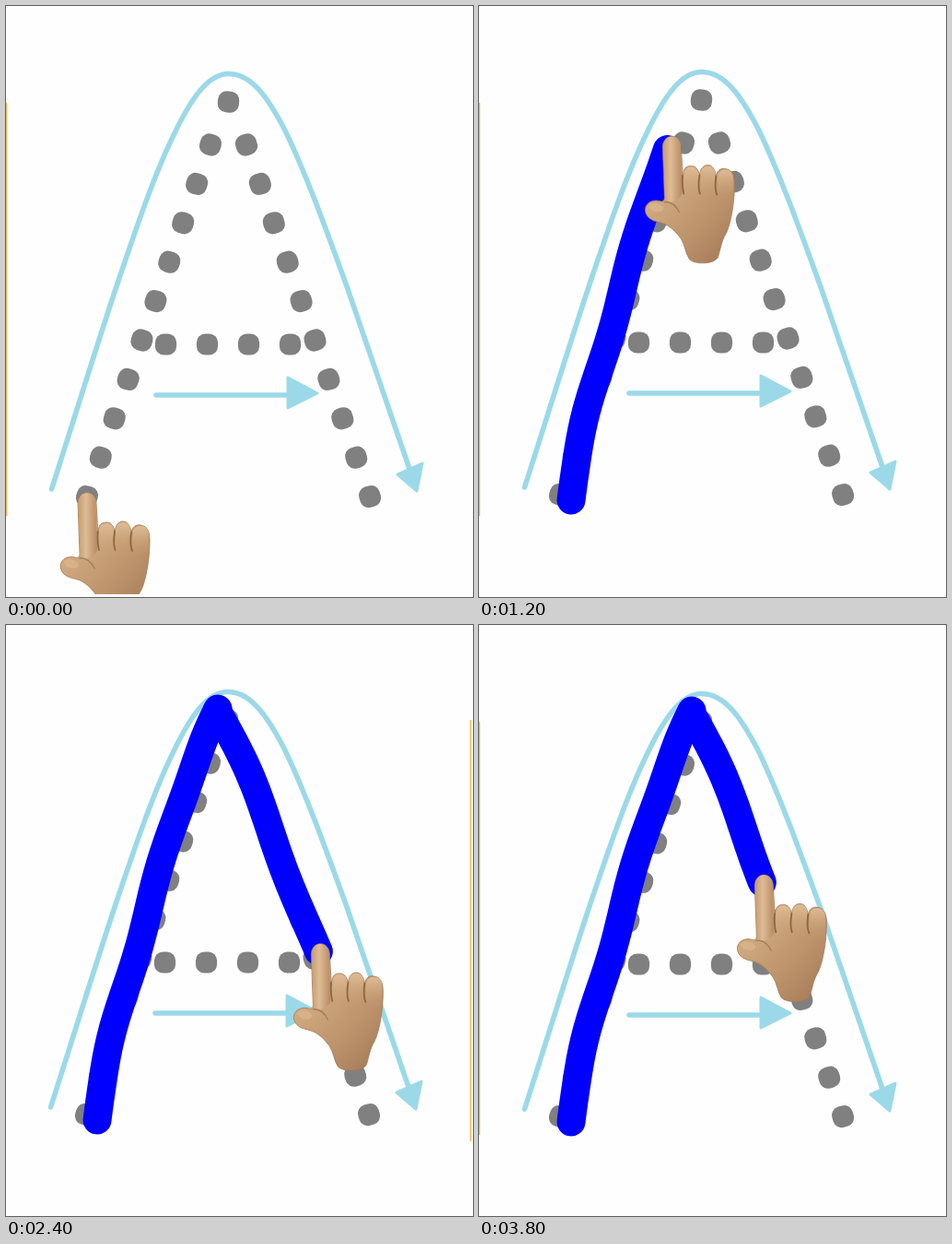
Recreate the animation shown at these times as an HTML page. Size 507 px wide and 641 px high, loop 4000 ms.

```html
<!DOCTYPE html>
<html lang="en">
<head>
<meta charset="utf-8">
<title>Tracing the letter A</title>
<style>
html, body { margin: 0; width: 100%; height: 100%; overflow: hidden; background: #fefefe; }
svg { display: block; width: 100%; height: 100%; }
</style>
</head>
<body>
<svg viewBox="0 0 507 641" preserveAspectRatio="none">
  <defs>
    <linearGradient id="skin" x1="0" y1="0" x2=".75" y2="1">
      <stop offset="0" stop-color="#deba92"/>
      <stop offset=".45" stop-color="#cda57c"/>
      <stop offset=".75" stop-color="#bb926a"/>
      <stop offset="1" stop-color="#a9805c"/>
    </linearGradient>
    <linearGradient id="finger" x1="0" x2="1">
      <stop offset="0" stop-color="#c59c70"/>
      <stop offset=".4" stop-color="#dfbc96"/>
      <stop offset="1" stop-color="#b58a62"/>
    </linearGradient>
    <linearGradient id="knuckle" x1="0" y1="0" x2="0" y2="1">
      <stop offset="0" stop-color="#dfbc96"/>
      <stop offset="1" stop-color="#c69c71" stop-opacity="0"/>
    </linearGradient>
    <clipPath id="crop"><rect width="507" height="638"/></clipPath>
  </defs>
  <g fill="#f6b95c">
    <rect id="leftEdge" y="105" width="1.2" height="448"/>
    <rect id="rightEdge" x="503.6" y="103" width="1.6" height="457"/>
  </g>
  <g id="art">
    <g fill="none" stroke="#9bd9e8" stroke-width="5.6" stroke-linecap="round" stroke-linejoin="round">
      <path d="M49.500 524C75 445 100 363 122 298C140 245 160 185 182 140C202 98 220 73.500 242 73.500C266 73.500 284 98 304 137C326 183 346 238 370 304L438 502"/>
      <path d="M163 422H306"/>
      <g fill="#9bd9e8" stroke-width="3">
        <path d="M425 508L452 496L446 526Z"/>
        <path d="M306 403V436L338 420Z"/>
      </g>
    </g>
    <g id="dots" fill="#808080"></g>
    <g id="ink" fill="none" stroke="#00f" stroke-width="31" stroke-linecap="round" stroke-linejoin="round"></g>
  </g>
  <g clip-path="url(#crop)">
    <g id="hand">
      <path fill="url(#skin)" stroke="#a37a55" stroke-width=".8" d="M-10 11C-9 -4 9 -4 10 11L12 45C12 35 15 32 21 32C26 32 29 36 30 42C31 35 34 31 39 31C44 31 47 36 48 43C49 37 53 34 58 35C66 36 68 43 68 52C68 72 64 95 59 105C53 115 53 122 50 131C46 139 24 139 19 133C15 127 14 117 10 111C2 100 -5 95 -14 93C-24 91 -29 86 -29 79C-28 71 -20 68 -13 70C-10 71 -8 70 -8 66Z"/>
      <path fill="url(#finger)" d="M-9.500 11C-8.500 -3.500 8.500 -3.500 9.500 11L11 62C8 70 -2 74 -7.500 68Z"/>
      <g fill="url(#knuckle)">
        <rect x="13" y="33" width="16" height="34" rx="8"/>
        <rect x="31" y="32" width="16" height="34" rx="8"/>
        <rect x="49.500" y="36" width="17" height="32" rx="8"/>
      </g>
      <g fill="none" stroke="#8d6643" stroke-width="1.800" stroke-linecap="round">
        <path d="M11.500 42Q11 55 13 62"/>
        <path d="M30 42Q28 55 30.500 62"/>
        <path d="M48 43Q46 56 49 63"/>
        <path stroke="#a67c55" stroke-width="1.400" d="M-8 71Q2 70 8 82"/>
      </g>
      <ellipse cx="-17" cy="77" rx="8" ry="4.500" fill="#dcb88f" opacity=".7" transform="rotate(12 -17 77)"/>
    </g>
  </g>
</svg>
<script>
const $ = id => document.getElementById(id);
const STEP = 200, LOOP = 4000;
const REPLAY_FROM = 3800, REPLAY_AT = 2200; // the loop ends on a glimpse of the second stroke
const REST = { x: 88, y: 528 };

// bow bends a stroke sideways; wave is its hand-drawn wobble; tip places the finger on the ink end.
const strokes = [
  { from: [100, 538], to: [231, 92], bow: -11.5, wave: -1.8, peak: 0.2, period: 0.42,
    start: 0, duration: 1360, power: 1.27, tip: [5, -14] },
  { from: [230, 94], to: [397, 535], bow: 10, wave: 2.5, peak: 0.12, period: 0.55,
    start: 1400, duration: 1400, power: 1.56, tip: [2, -8] },
  { from: [150, 354], to: [325, 352], bow: 0, wave: 0, peak: 0, period: 1,
    start: 3000, duration: 440, power: 1, tip: [6, -8] }
];

// The paper drifts between these points: time, x, y.
const drift = [[0, 0, 0], [800, -3, 1], [1200, 0, -2], [2000, 2, -2],
  [2800, -4, 0], [3200, 2, 0], [3800, 0, 1]];

const lerp = (a, b, k) => a + (b - a) * k;
const clamp = k => Math.min(1, Math.max(0, k));

function addDot(x, y, turn) {
  $("dots").insertAdjacentHTML("beforeend",
    `<rect x="-11.6" y="-11.6" width="23.2" height="23.2" rx="9.5" transform="translate(${x} ${y}) rotate(${turn})"/>`);
}
addDot(241.5, 104, 5);
for (let i = 0; i < 10; i++) {
  addDot(222 - 14.9 * i, 150.5 + 42.4 * i, 17);
  addDot(261 + 14.9 * i, 150.5 + 42.4 * i, -17);
}
for (let i = 0; i < 4; i++) addDot(173.5 + 45 * i, 367, 0);

for (const stroke of strokes)
  stroke.path = $("ink").appendChild(document.createElementNS("http://www.w3.org/2000/svg", "path"));

function pointOn({ from, to, bow, wave, peak, period }, k) {
  const belly = 1 - (2 * k - 1) ** 4;
  const wobble = wave * Math.cos(2 * Math.PI * (k - peak) / period);
  return [lerp(from[0], to[0], k) + belly * (bow + wobble), lerp(from[1], to[1], k)];
}

function drawInk(stroke, amount) {
  const count = 40;
  const pts = Array.from({ length: count + 1 }, (_, i) => pointOn(stroke, amount * i / count));
  stroke.path.setAttribute("d", amount ? "M" + pts.join("L") : "");
  return pts[count];
}

function driftAt(ms) {
  const i = Math.max(1, drift.findIndex(p => p[0] >= ms));
  const [a, b] = [drift[i - 1], drift[i]];
  const k = (ms - a[0]) / (b[0] - a[0]);
  return [lerp(a[1], b[1], k), lerp(a[2], b[2], k)];
}

const show = (id, visible) => { $(id).style.display = visible ? "" : "none"; };

function render(elapsed) {
  const ms = Math.floor((elapsed % LOOP) / STEP) * STEP;
  const pen = ms >= REPLAY_FROM ? REPLAY_AT : ms;
  const [dx, dy] = driftAt(ms);
  let hand = REST;
  for (const stroke of strokes) {
    const amount = clamp((pen - stroke.start) / stroke.duration) ** stroke.power;
    const [x, y] = drawInk(stroke, amount);
    if (amount) hand = { x: x + dx + stroke.tip[0], y: y + dy + stroke.tip[1] };
  }
  $("art").setAttribute("transform", `translate(${dx} ${dy})`);
  $("hand").setAttribute("transform", `translate(${hand.x} ${hand.y})`);
  show("leftEdge", ms < 400 || (ms >= 1200 && ms < 1800) || ms >= 3600);
  show("rightEdge", ms >= 1800 && ms < 3200);
}

const begin = performance.now();
function tick() {
  render(performance.now() - begin);
  requestAnimationFrame(tick);
}
tick();
</script>
</body>
</html>
```
